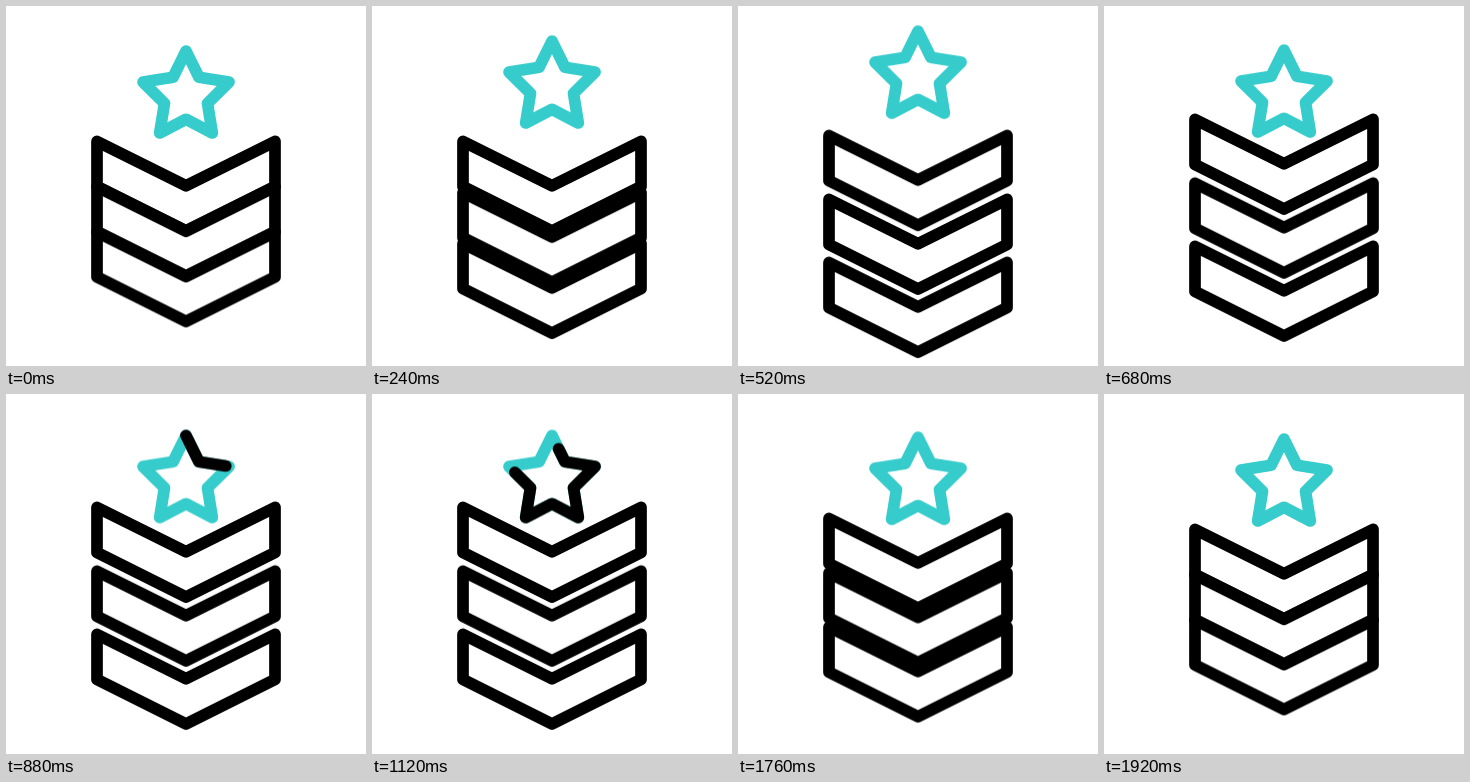
Recreate the animation shown at these times as an HTML page. Size 360 by 360 pixels, loop 2 s.

```html
<!DOCTYPE html>
<html lang="en">
<head>
<meta charset="utf-8">
<title>Rank badge</title>
<style>
  @property --from { syntax: "<length>"; inherits: false; initial-value: 0px; }
  @property --to { syntax: "<length>"; inherits: false; initial-value: 0px; }

  html, body {
    margin: 0;
    width: 100%;
    height: 100%;
    overflow: hidden;
    background: #fff;
  }
  svg { display: block; width: 100%; height: 100%; }
  path, use {
    fill: none;
    stroke-width: 11.7;
    stroke-linecap: round;
    stroke-linejoin: round;
  }

  .chevrons, .chevrons use, .star, .trace {
    animation: 2s cubic-bezier(.3333, 0, .6667, 1) infinite;
  }
  .chevrons { stroke: #000; animation-name: lift; }
  .chevrons use { animation-name: spread; }
  .star { stroke: #37cccc; animation-name: hop; }
  .trace {
    stroke: #000;
    stroke-dasharray: calc(var(--to) - var(--from)) 200px;
    stroke-dashoffset: calc(-1 * var(--from));
    animation-name: head, tail, show;
  }

  @keyframes spread {
    0%, 6%, 96%, 100% { transform: translateY(0); }
    22%, 80% { transform: translateY(var(--gap)); }
  }
  @keyframes lift {
    0%, 22%, 96%, 100% { transform: translateY(0); }
    34%, 80% { transform: translateY(-22px); }
  }
  @keyframes hop {
    0%, 6%, 32%, 96%, 100% { transform: translateY(0); }
    22% { transform: translateY(-31px); }
    38%, 80% { transform: translateY(-3.5px); }
  }

  /* The black stroke runs clockwise from the top point, then its tail follows. */
  @keyframes head {
    0%, 36% { --to: 0px; }
    65%, 100% { --to: 100px; }
  }
  @keyframes tail {
    0%, 52% { --from: 0px; }
    82%, 100% { --from: 100px; }
  }
  @keyframes show {
    0%, 100% { visibility: hidden; animation-timing-function: step-end; }
    36.5% { visibility: visible; animation-timing-function: step-end; }
    81.5% { visibility: hidden; animation-timing-function: step-end; }
  }
</style>
</head>
<body>
<svg viewBox="0 0 360 360">
  <defs>
    <path id="chevron" d="M91 135.4 180 179.8 269 135.4V180.6L180 225 91 180.6Z"/>
    <path id="star" pathLength="100" d="M180 45 193 71.3 223 76 201.5 97.3 206.3 127 180 113.3 153.7 127 158.5 97.3 137 76 167 71.3Z"/>
  </defs>
  <g class="chevrons">
    <use href="#chevron" style="--gap: 0px"/>
    <use href="#chevron" y="45.2" style="--gap: 18.6px"/>
    <use href="#chevron" y="90.4" style="--gap: 36.5px"/>
  </g>
  <g class="star">
    <use href="#star"/>
    <use href="#star" class="trace"/>
  </g>
</svg>
</body>
</html>
```
